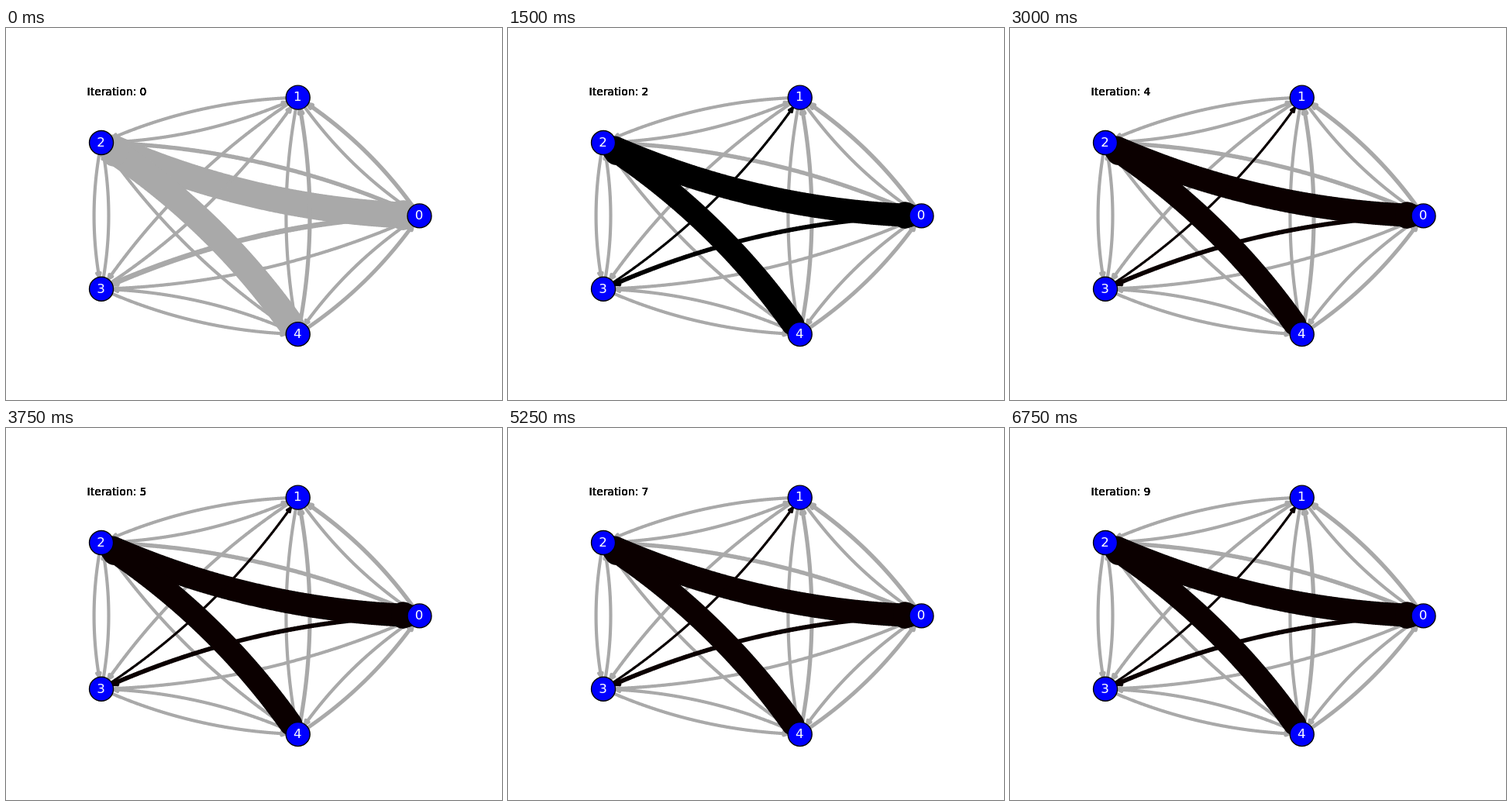
An HTML page with a canvas that plays this animation: 640x480 px, repeating every 7.5 s.

```html
<!DOCTYPE html>
<html lang="en">
<head>
<meta charset="utf-8">
<title>Weighted graph iterations</title>
<style>
  html, body { margin: 0; width: 100%; height: 100%; overflow: hidden; background: #fff; }
  canvas { display: block; }
</style>
</head>
<body>
<canvas id="stage" width="640" height="480"></canvas>
<script>
const ctx = document.getElementById('stage').getContext('2d');
const STEP = 750, STEPS = 10;
const FONT = '"DejaVu Sans", sans-serif';
const NODE_R = 15.5, BEND = 0.1, THIN = 4.17;

const nodes = Array.from({ length: 5 }, (_, i) => {
  const a = i * 2 * Math.PI / 5;
  return { x: 306.6 + 226.9 * Math.cos(a), y: 242.4 - 160.6 * Math.sin(a) };
});

// "from-to": line width while grey
const greyWidth = { '2-0': 34, '4-2': 34, '0-3': 6.9, '0-2': 5.4, '0-1': 5.4, '4-1': 5.2, '4-0': 5 };
// edges highlighted from the third step on
const darkWidth = { '2-0': 30, '4-2': 30, '0-3': 5.8, '3-1': 3.2 };

// Quadratic arc between two nodes, trimmed to the node rims
function arcPoints(a, b) {
  const cx = (a.x + b.x) / 2 - BEND * (b.y - a.y);
  const cy = (a.y + b.y) / 2 + BEND * (b.x - a.x);
  const outside = (p, n) => Math.hypot(p.x - n.x, p.y - n.y) >= NODE_R;
  const pts = [];
  for (let i = 0; i <= 400; i++) {
    const t = i / 400, u = 1 - t;
    const p = {
      x: u * u * a.x + 2 * u * t * cx + t * t * b.x,
      y: u * u * a.y + 2 * u * t * cy + t * t * b.y
    };
    if (outside(p, a) && outside(p, b)) pts.push(p);
  }
  return pts;
}

const edges = [];
nodes.forEach((a, i) => nodes.forEach((b, j) => {
  if (i !== j) edges.push({ key: i + '-' + j, pts: arcPoints(a, b) });
}));

function drawEdge({ pts }, width, color) {
  ctx.strokeStyle = ctx.fillStyle = color;
  ctx.lineWidth = width;
  ctx.lineCap = ctx.lineJoin = 'round';
  ctx.beginPath();
  pts.forEach(p => ctx.lineTo(p.x, p.y));
  ctx.stroke();

  // arrow head
  const tip = pts[pts.length - 1], back = pts[pts.length - 6];
  const len = Math.hypot(tip.x - back.x, tip.y - back.y);
  const dx = (tip.x - back.x) / len, dy = (tip.y - back.y) / len;
  const bx = tip.x - 5.2 * dx, by = tip.y - 5.2 * dy, half = 2.3;
  ctx.beginPath();
  ctx.moveTo(bx - half * dy, by + half * dx);
  ctx.lineTo(tip.x, tip.y);
  ctx.lineTo(bx + half * dy, by - half * dx);
  ctx.closePath();
  ctx.fill();
  ctx.stroke();
}

function drawNode({ x, y }, label) {
  ctx.beginPath();
  ctx.arc(x, y, NODE_R, 0, 2 * Math.PI);
  ctx.fillStyle = '#00f';
  ctx.fill();
  ctx.strokeStyle = '#000';
  ctx.lineWidth = 1.39;
  ctx.stroke();
  ctx.fillStyle = '#fff';
  ctx.font = '16.67px ' + FONT;
  ctx.textAlign = 'center';
  ctx.fillText(label, x - 0.4, Math.round(y + 4.8));
}

function draw(step) {
  ctx.fillStyle = '#fff';
  ctx.fillRect(0, 0, 640, 480);

  const isDark = e => step >= 2 && e.key in darkWidth;
  const dark = step === 2 ? '#000' : '#0b0000';
  edges.filter(e => !isDark(e)).forEach(e => drawEdge(e, greyWidth[e.key] || THIN, '#a9a9a9'));
  edges.filter(isDark).forEach(e => drawEdge(e, darkWidth[e.key], dark));
  nodes.forEach(drawNode);

  ctx.fillStyle = '#000';
  ctx.font = '13.89px ' + FONT;
  ctx.textAlign = 'left';
  // stacked passes thicken the soft glyph edges
  for (let i = 0; i < 5; i++) ctx.fillText('Iteration: ' + step, 104.6, 87);
}

let shown = -1;
function tick() {
  const step = Math.floor(performance.now() / STEP) % STEPS;
  if (step !== shown) draw(shown = step);
  requestAnimationFrame(tick);
}
tick();
</script>
</body>
</html>
```
